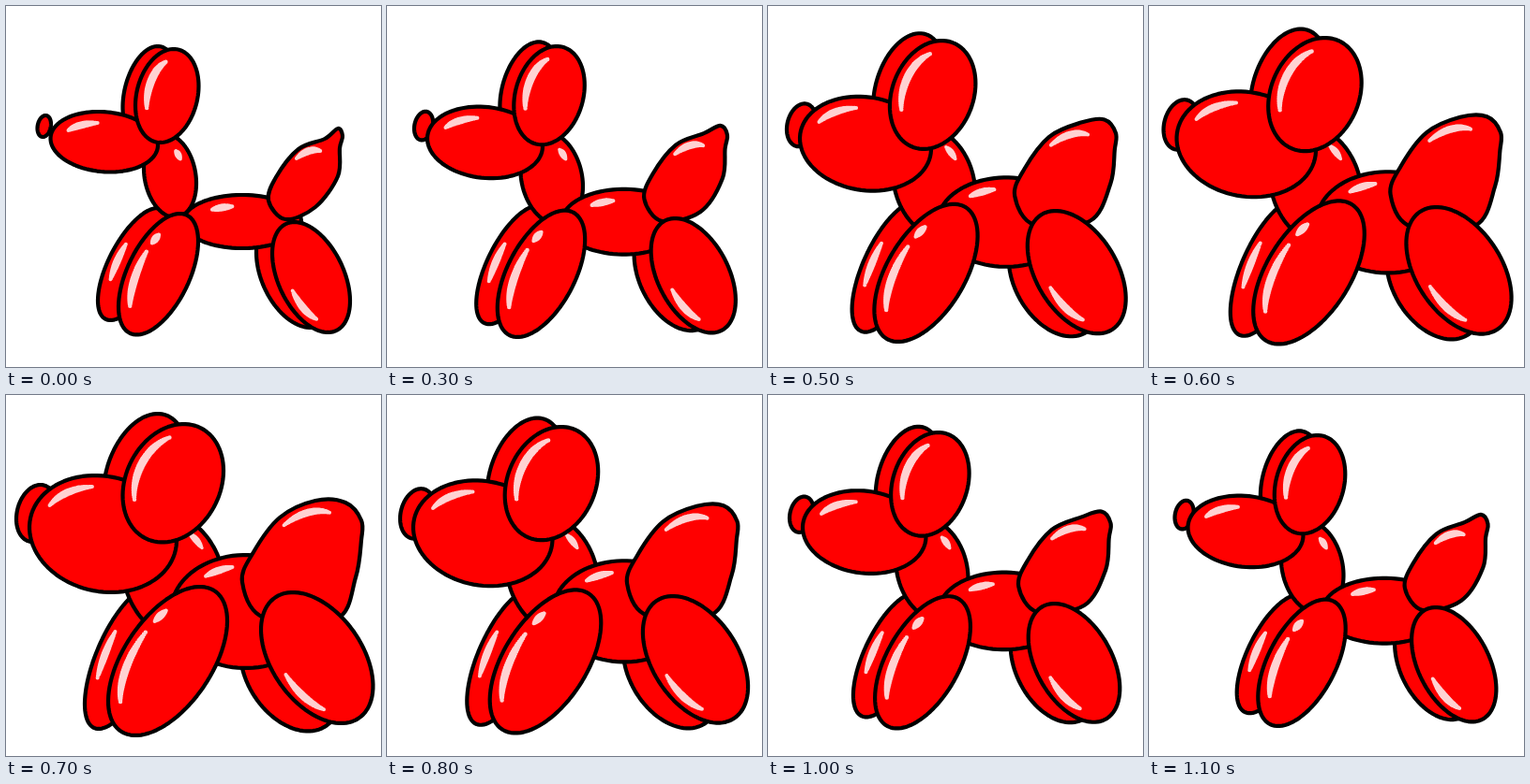
Write an HTML page with a canvas that moves like this. It is 400 by 386 pixels and loops after 1200 ms.

```html
<!DOCTYPE html>
<html lang="en">
<head>
<meta charset="utf-8">
<title>Balloon dog</title>
<style>
  html, body { margin: 0; width: 100%; height: 100%; overflow: hidden; background: #fff; }
  canvas { display: block; }
</style>
</head>
<body>
<canvas id="stage" width="400" height="386"></canvas>
<script>
const ctx = document.getElementById('stage').getContext('2d');
const STEP = 100, STEPS = 12, PEAK = 7, RAMP = 5;
const INSET = 12;
const LINE = 4.2;

const mix = (slim, full, air) => slim.map((v, i) => v + (full[i] - v) * air);

function paint() {
  ctx.fillStyle = '#f00';
  ctx.strokeStyle = '#000';
  ctx.lineWidth = LINE;
  ctx.lineJoin = 'round';
  ctx.fill();
  ctx.stroke();
}

// Slanted ellipse that fills a box; shrink moves it inward. Returns angle => point
function oval([left, top, right, bottom], slant, shrink = 0) {
  const half = (right - left) / 2, tall = (bottom - top) / 2;
  const lean = half * slant, wide = half * Math.sqrt(1 - slant * slant) - shrink;
  return a => {
    const v = Math.sin(a) * (tall - shrink);
    return [
      (left + right) / 2 + Math.cos(a) * wide + lean * v / tall,
      (top + bottom) / 2 + v
    ];
  };
}

// Highlight that follows the rim between two angles in degrees
function shine(box, slant, [from, to, width = 8, inset = INSET]) {
  const rim = oval(box, slant, inset);
  ctx.fillStyle = '#ffd2d2';
  ctx.beginPath();
  for (let t = 0; t <= 1; t += 1 / 32) {
    const [x, y] = rim((from + (to - from) * t) * Math.PI / 180);
    const r = width / 2 * (.5 + .5 * Math.sin(Math.PI * t));
    ctx.moveTo(x + r, y);
    ctx.arc(x, y, r, 0, 2 * Math.PI);
  }
  ctx.fill();
}

function bulb(slim, full, slant, ...shines) {
  return air => {
    const box = mix(slim, full, air);
    const rim = oval(box, slant);
    ctx.beginPath();
    for (let d = 0; d < 360; d += 4) ctx.lineTo(...rim(d * Math.PI / 180));
    ctx.closePath();
    paint();
    for (const s of shines) shine(box, slant, s);
  };
}

// Smooth closed curve through points
function smooth(points) {
  const at = i => points[(i + points.length) % points.length];
  ctx.beginPath();
  ctx.moveTo(...at(0));
  points.forEach((b, i) => {
    const a = at(i - 1), c = at(i + 1), d = at(i + 2);
    ctx.bezierCurveTo(
      b[0] + (c[0] - a[0]) / 6, b[1] + (c[1] - a[1]) / 6,
      c[0] - (d[0] - b[0]) / 6, c[1] - (d[1] - b[1]) / 6,
      ...c);
  });
  ctx.closePath();
}

function tail(air) {
  const slim = [[280, 208], [288, 183], [312, 153], [340, 142], [354, 131],
    [359, 139], [356, 152], [354, 182], [330, 215], [298, 228]];
  const full = [[252, 200], [264, 168], [292, 131], [330, 113], [362, 115],
    [379, 134], [379, 155], [373, 195], [352, 240], [275, 238]];
  smooth(slim.map((p, i) => mix(p, full[i], air)));
  paint();
  shine(mix([280, 142, 357, 228], [252, 112, 376, 240], air), -.4, [225, 285]);
}

// Back to front; each box is left, top, right, bottom
const farEar = bulb([124.5, 43, 182, 143], [104, 20, 193, 150], -.3);
const nose = bulb([33.5, 117, 48, 140], [11, 96, 54, 157], -.2);
const farFrontLeg = bulb([98, 216, 175, 336], [84, 205, 169, 357], -.65, [161, 205, 8, 10]);
const neck = bulb([147, 137, 203, 226], [124, 126, 233, 262], .18, [-55, -33, 7]);
const head = bulb([47.5, 113, 162, 177.5], [25, 86, 182, 211], .11, [217, 266]);
const nearEar = bulb([138, 46, 205.5, 146], [124.5, 31, 232, 157.5], -.21, [160, 252, 9]);
const farHindLeg = bulb([267, 225, 353, 344], [250, 235, 357, 359.5], .35);
const body = bulb([189, 202, 315, 259], [176, 171, 335, 292], 0, [231, 258]);
const nearFrontLeg = bulb([120, 222, 205, 351.5], [109, 205, 236, 364], -.54, [219, 233], [140, 207, 9]);
const nearHindLeg = bulb([284, 231, 367, 349], [272, 211, 391.5, 351], .43, [108, 162]);

const dog = [
  farEar, nose, farFrontLeg, neck, head, nearEar,
  farHindLeg, body, nearFrontLeg, tail, nearHindLeg
];

function draw(step) {
  const air = Math.max(0, 1 - Math.abs(step - PEAK) / RAMP);
  ctx.setTransform(1, 0, 0, 1, 0, 0);
  ctx.fillStyle = '#fff';
  ctx.fillRect(0, 0, 400, 386);
  // The dog sits slightly further left while it deflates
  if (step > PEAK) ctx.translate(-1.5, 0);
  for (const part of dog) part(air);
}

const start = performance.now();
function tick() {
  draw(Math.floor((performance.now() - start) / STEP) % STEPS);
  requestAnimationFrame(tick);
}
tick();
</script>
</body>
</html>
```
